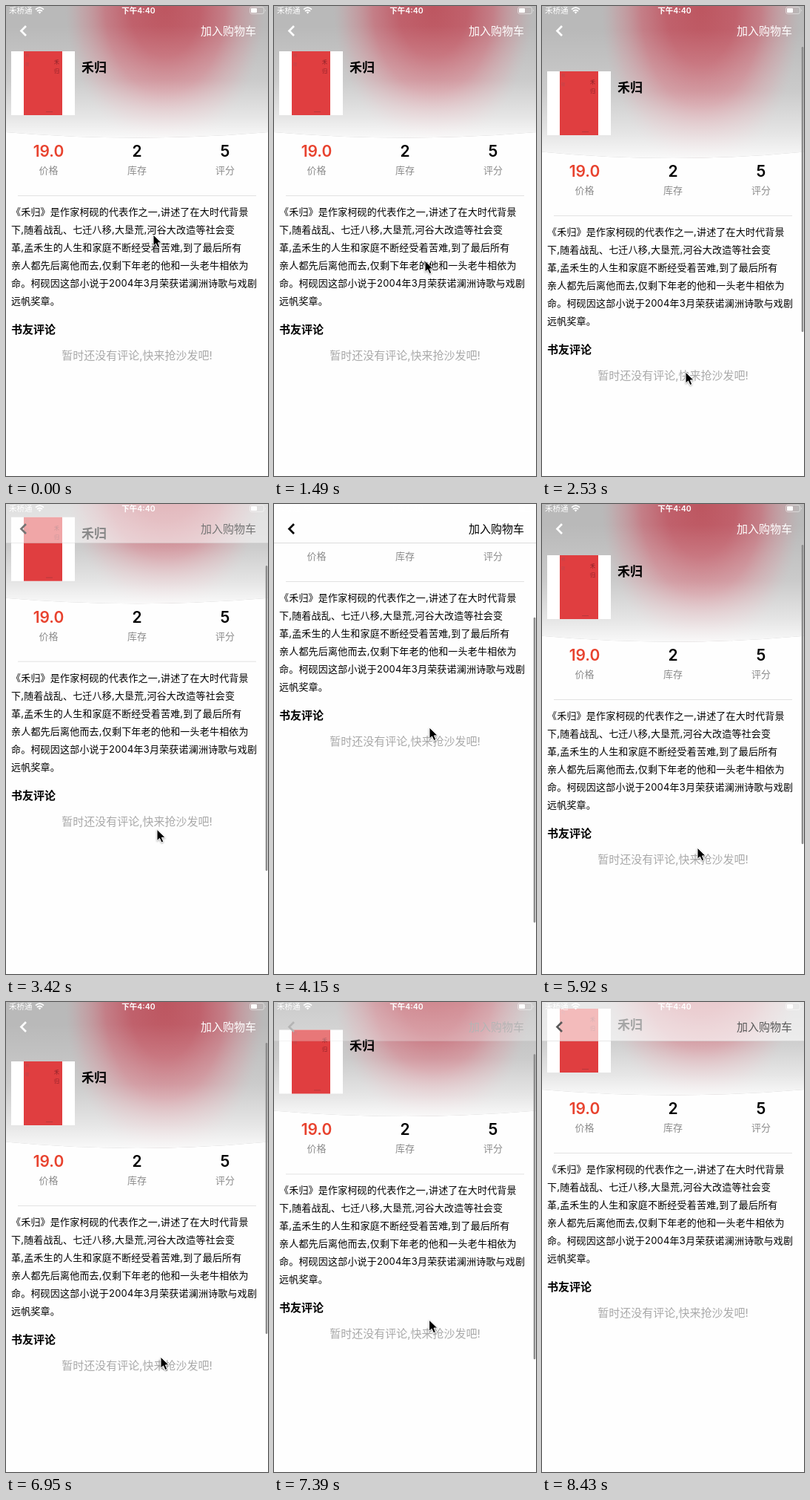
Recreate the animation shown at these times as an HTML page. Size 354 by 633 pixels, loop 8730 ms.

```html
<!DOCTYPE html>
<html lang="zh-CN">
<head>
<meta charset="utf-8">
<style>
  html, body { margin: 0; width: 100%; height: 100%; overflow: hidden; background: #fefefe; }
  svg { display: block; width: 354px; height: 633px; font-family: Inter, "Noto Sans CJK SC", "Noto Sans CJK", sans-serif; }
  .mid { text-anchor: middle; }
  .bold { font-weight: 600; }
  .num { font-size: 21px; }
  .label { font-size: 13px; fill: #8c8c8c; }
  .story { font-size: 13px; letter-spacing: .2px; }
</style>
</head>
<body>
<svg viewBox="0 0 354 633">
  <defs>
    <radialGradient id="red" gradientUnits="userSpaceOnUse" cx="0" cy="0" r="1" gradientTransform="translate(215) scale(135 195)">
      <stop offset="0" stop-color="#bd5660"/>
      <stop offset=".35" stop-color="#c0616c"/>
      <stop offset=".6" stop-color="#c57680" stop-opacity=".88"/>
      <stop offset=".85" stop-color="#c99299" stop-opacity=".42"/>
      <stop offset="1" stop-color="#c4a4a8" stop-opacity="0"/>
    </radialGradient>
    <linearGradient id="fade" gradientUnits="userSpaceOnUse" x1="0" y1="0" x2="0" y2="178">
      <stop offset=".15" stop-color="#fff" stop-opacity="0"/>
      <stop offset=".56" stop-color="#fff" stop-opacity=".26"/>
      <stop offset=".84" stop-color="#fff" stop-opacity=".64"/>
      <stop offset="1" stop-color="#fff" stop-opacity=".92"/>
    </linearGradient>
    <path id="banner" d="M0 0H354V170Q177 185 0 170Z"/>
  </defs>

  <g id="header">
    <use href="#banner" fill="#b9b9b9"/>
    <use href="#banner" fill="url(#red)"/>
    <use href="#banner" fill="url(#fade)"/>
  </g>

  <g id="content">
    <path fill="#fff" d="M7 61h86v86H7z"/>
    <path fill="#e03e40" d="M24 61h52v86H24z"/>
    <g font-size="7" fill="#8c2228">
      <text x="65" y="78">禾</text><text x="65" y="90">归</text>
      <g font-size="5" fill="#b8484c"><text x="26" y="68">柯</text><text x="26" y="80">砚</text></g>
      <path d="M54 142.5h9" stroke="#b8383c"/>
    </g>
    <text class="bold" x="102" y="89" font-size="17">禾归</text>

    <g class="mid">
      <g class="num bold">
        <text x="57.5" y="203" fill="#e8432f">19.0</text>
        <text x="177" y="203">2</text>
        <text x="296" y="203">5</text>
      </g>
      <g class="label">
        <text x="57.5" y="226">价格</text>
        <text x="177" y="226">库存</text>
        <text x="296" y="226">评分</text>
      </g>
      <text x="177" y="476" font-size="15" fill="#a9a9a9">暂时还没有评论,快来抢沙发吧!</text>
    </g>
    <path d="M16 255.5H338" stroke="#e2e2e2"/>

    <text class="story" y="282">
      <tspan x="7">《禾归》是作家柯砚的代表作之一,讲述了在大时代背景</tspan>
      <tspan x="7" dy="24">下,随着战乱、七迁八移,大垦荒,河谷大改造等社会变</tspan>
      <tspan x="7" dy="24">革,孟禾生的人生和家庭不断经受着苦难,到了最后所有</tspan>
      <tspan x="7" dy="24">亲人都先后离他而去,仅剩下年老的他和一头老牛相依为</tspan>
      <tspan x="7" dy="24">命。柯砚因这部小说于2004年3月荣获诺澜洲诗歌与戏剧</tspan>
      <tspan x="7" dy="24">远帆奖章。</tspan>
    </text>
    <text class="bold" x="7" y="441" font-size="15">书友评论</text>
  </g>

  <g id="navBack">
    <path fill="#fefefe" d="M0 0H354V52H0z"/>
    <path d="M0 52.5H354" stroke="#dcdcdc"/>
  </g>
  <g id="nav">
    <path d="M27 27 20.5 33.5 27 40" fill="none" stroke="currentColor" stroke-width="2.7"/>
    <text x="338" y="38.5" font-size="15" text-anchor="end" fill="currentColor">加入购物车</text>
  </g>

  <g fill="#fff" font-size="10.5">
    <text x="4" y="10">禾桥通</text>
    <text class="mid bold" x="179" y="10">下午4:40</text>
    <g fill="none" stroke="#fff" stroke-width="1.7">
      <path d="M40 4.6Q45.5 -.2 51 4.6M42 7Q45.5 4 49 7"/>
      <rect x="329.5" y="1.5" width="19" height="9" rx="2.5" stroke-width="1" stroke-opacity=".45"/>
    </g>
    <path d="M43.6 8.3Q45.5 6.8 47.4 8.3L45.5 10.6Z"/>
    <rect x="331" y="3" width="8" height="6" rx="1"/>
    <path d="M350 4.5q2 1.5 0 3z" fill-opacity=".45"/>
  </g>

  <rect id="bar" x="350.7" width="2.6" rx="1.3" fill="#8c8c8c"/>
  <path id="cursor" d="M0 0V15.2L3.5 12 6 17.6 8.8 16.4 6.4 10.9H11.2Z" stroke="#fff" style="filter:drop-shadow(0 1px 1px #0005)"/>
</svg>
<script>
const LOOP = 8730, TICKS = 59;
const el = id => document.getElementById(id);
const clamp = v => Math.min(1, Math.max(0, v));

// tick, scroll, cursor x, cursor y
const keys = [
  [0, 0, 199, 308], [9, 0, 199, 308], [10, 0, 204, 343], [13, -50, 203, 440],
  [15, -82, 200, 520], [16, -62, 196, 510], [17, -27, 194, 493], [18, -8, 194, 498],
  [20, 0, 196, 505], [22, 20, 202, 470], [25, 90, 208, 375], [28, 151, 210, 301],
  [30, 160, 210, 301], [32, 160, 210, 301], [33, 150, 211, 318], [35, 117, 212, 361],
  [37, 60, 211, 410], [40, -8, 210, 463], [44, -31, 209, 503], [46, -31, 209, 503],
  [47, -19, 209, 478], [52, 52, 210, 395], [53, 52, 210, 395], [57, 52, 264, 640],
  [TICKS, 52, 264, 640]
];

function pose(tick) {
  const i = keys.findIndex(k => k[0] > tick);
  const a = keys[i - 1], b = keys[i], p = (tick - a[0]) / (b[0] - a[0]);
  return a.map((v, n) => v + (b[n] - v) * p);
}

function draw(time) {
  // the screen refreshes in even ticks, slightly ahead of the clock
  const tick = Math.floor(time % LOOP / LOOP * TICKS + .05) % TICKS;
  const [, scroll, x, y] = pose(tick);
  const pull = Math.max(0, -scroll), solid = clamp(scroll / 80);
  const shade = Math.round(255 * (1 - solid));

  el('header').setAttribute('transform', `translate(0 ${-Math.max(0, scroll)}) scale(1 ${1 + pull / 174})`);
  el('content').setAttribute('transform', `translate(0 ${-scroll})`);
  el('navBack').setAttribute('opacity', solid);
  el('nav').style.color = `rgb(${shade},${shade},${shade})`;

  const bar = el('bar');
  bar.setAttribute('y', 55 + Math.max(0, scroll) * .648);
  bar.setAttribute('height', 411 - pull);
  bar.setAttribute('opacity', tick > 10 ? clamp((57 - tick) / 4) : 0);
  el('cursor').setAttribute('transform', `translate(${x} ${y})`);
}

const start = performance.now();
(function frame() {
  draw(performance.now() - start);
  requestAnimationFrame(frame);
})();
</script>
</body>
</html>
```
